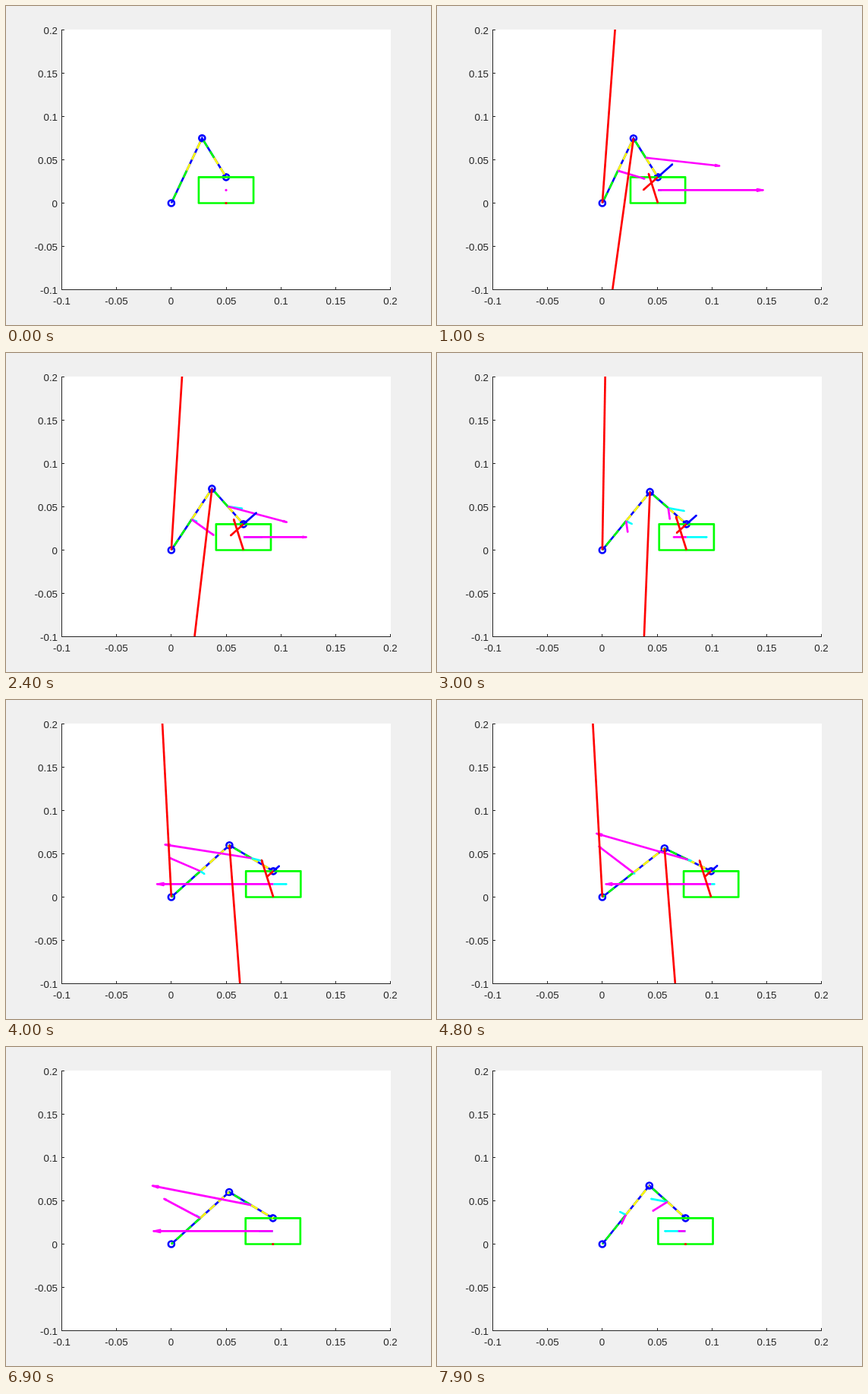
An HTML page with a canvas that plays this animation: 560x420 px, repeating every 8000 ms.

```html
<!DOCTYPE html>
<html lang="en">
<head>
<meta charset="utf-8">
<title>Two-link arm pushing a box</title>
<style>
  html, body { margin: 0; width: 100%; height: 100%; overflow: hidden; background: #f0f0f0; }
  canvas { display: block; width: 560px; height: 420px; }
</style>
</head>
<body>
<canvas id="stage" width="560" height="420"></canvas>
<script>
const ctx = document.getElementById('stage').getContext('2d');
const LOOP = 8000, STEP = 100, HOLD = 400;
const L1 = 0.08, L2 = 0.05, TOP = 0.03, HALF = 0.025;
const M1 = 0.5, M2 = 0.3, BOX = 0.05, G = 9.8;
const FRICTION = 0.25, LIFT = 1.12;   // LIFT: vertical / horizontal push at the tip
const DT = 0.01, SCALE = 0.1, TRAVEL = 0.05, OUT = 50, BACK = 49;

const X = v => 217.85 + v * 1443.4;
const Y = v => 259.5 - v * 1140;
const add = (a, b, k = 1) => [a[0] + b[0] * k, a[1] + b[1] * k];
const mul = (a, k) => [a[0] * k, a[1] * k];
const mid = (a, b) => mul(add(a, b), 0.5);

// Quintic rest-to-rest travel, out and back again
function travel(n) {
  const out = n <= OUT, count = out ? OUT : BACK;
  const u = Math.max(0, out ? n : n - OUT - 1) / count;
  const span = count * DT, dir = out ? 1 : -1;
  return {
    x: (out ? 0.05 : 0.1) + dir * TRAVEL * u ** 3 * (10 - 15 * u + 6 * u * u),
    v: dir * TRAVEL * 30 * (u * (1 - u)) ** 2 / span,
    a: dir * TRAVEL * 60 * u * (1 - u) * (1 - 2 * u) / span ** 2
  };
}

function pose(n) {
  const { x } = travel(n), d2 = x * x + TOP * TOP;
  const a = (L1 * L1 - L2 * L2 + d2) / (2 * d2);
  const h = Math.sqrt(L1 * L1 / d2 - a * a);
  const tip = [x, TOP], joint = [a * x - h * TOP, a * TOP + h * x];
  return { tip, joint, c1: mid([0, 0], joint), c2: mid(joint, tip) };
}

function line(points, color, dash = []) {
  ctx.strokeStyle = color;
  ctx.lineWidth = 2.67;
  ctx.setLineDash(dash);
  ctx.beginPath();
  points.forEach(p => ctx.lineTo(X(p[0]), Y(p[1])));
  ctx.stroke();
  ctx.setLineDash([]);
}

function dot(p, color) {
  ctx.fillStyle = color;
  ctx.beginPath();
  ctx.arc(X(p[0]), Y(p[1]), 1.6, 0, 7);
  ctx.fill();
}

function arrow(from, vector, color) {
  const to = add(from, mul(vector, SCALE));
  const dx = X(to[0]) - X(from[0]), dy = Y(to[1]) - Y(from[1]);
  const length = Math.hypot(dx, dy);
  if (length < 0.5) return;
  line([from, to], color);
  const head = length * 0.06, half = length * 0.012;
  ctx.save();
  ctx.translate(X(to[0]), Y(to[1]));
  ctx.rotate(Math.atan2(dy, dx));
  ctx.fillStyle = color;
  ctx.lineWidth = 1.8;
  ctx.lineJoin = 'round';
  ctx.beginPath();
  ctx.moveTo(0, 0);
  ctx.lineTo(-head, -half);
  ctx.lineTo(-head, half);
  ctx.closePath();
  ctx.fill();
  ctx.stroke();
  ctx.restore();
}

function axes() {
  ctx.fillStyle = '#f0f0f0';
  ctx.fillRect(0, 0, 560, 420);
  ctx.fillStyle = '#fff';
  ctx.fillRect(73, 31, 434, 343);
}

function rulers() {
  ctx.fillStyle = '#262626';
  ctx.fillRect(73, 31, 1, 343);
  ctx.fillRect(73, 373, 434, 1);
  ctx.font = '13.33px "Liberation Sans", Arial, sans-serif';
  for (let i = -2; i <= 4; i++) {
    const v = i * 0.05, label = String(+v.toFixed(2));
    const px = Math.round(X(v) - 0.5), py = Math.round(Y(v) - 0.5);
    ctx.fillRect(px, 370, 1, 4);
    ctx.fillRect(73, py, 4, 1);
    ctx.textAlign = 'center';
    ctx.fillText(label, px + 0.5, 393);
    ctx.textAlign = 'right';
    ctx.fillText(label, 68, py + 6);
  }
}

function draw(n) {
  const now = pose(n), last = pose(n - 1), older = pose(n - 2);
  const { v, a } = travel(n), { tip, joint, c1, c2 } = now;
  const base = [0, 0], foot = [tip[0], 0], center = [tip[0], TOP / 2];
  const speed = key => mul(add(now[key], last[key], -1), 1 / DT);
  const accel = key => mul(add(add(now[key], older[key]), last[key], -2), 1 / DT ** 2);
  const a1 = accel('c1'), a2 = accel('c2');

  axes();
  ctx.save();
  ctx.beginPath();
  ctx.rect(73, 31, 434, 343);
  ctx.clip();

  line([base, joint, tip], '#00f');
  for (const p of [base, joint, tip]) {
    ctx.beginPath();
    ctx.arc(X(p[0]), Y(p[1]), 4, 0, 7);
    ctx.stroke();
  }
  const left = tip[0] - HALF, right = tip[0] + HALF;
  ctx.lineJoin = 'round';
  line([[left, 0], [right, 0], [right, TOP], [left, TOP], [left, 0], [right, 0]], '#0f0');

  // Dashes run outwards from each link's centre of mass
  const dash = [10, 6];
  line([c1, base], '#0f0', dash);
  line([c1, joint], '#ff0', dash);
  line([c2, joint], '#0f0', dash);
  line([c2, tip], '#ff0', dash);

  arrow(c1, speed('c1'), '#0ff');
  arrow(c2, speed('c2'), '#0ff');
  arrow(center, [v, 0], '#0ff');
  arrow(c1, a1, '#f0f');
  arrow(c2, a2, '#f0f');
  arrow(center, [a, 0], '#f0f');
  if (!a) dot(center, '#f0f');

  if (n > 0 && n < OUT) {
    const fx = (FRICTION * BOX * G + BOX * a) / (1 + FRICTION * LIFT);
    const push = [fx, fx * LIFT], normal = BOX * G - push[1];
    const carry = add(push, add(a2, [0, G]), M2);
    const support = add(carry, add(a1, [0, G]), M1);
    arrow(tip, push, '#00f');
    arrow(base, support, '#f00');
    arrow(joint, mul(carry, -1), '#f00');
    arrow(tip, mul(push, -1), '#f00');
    arrow(foot, [-FRICTION * normal, normal], '#f00');
  } else {
    dot(foot, '#f00');
  }
  ctx.restore();
  rulers();
}

const start = performance.now();
function frame() {
  const t = Math.max(0, performance.now() - start) % LOOP;
  draw(Math.max(0, Math.floor((t - HOLD) / STEP)));
  requestAnimationFrame(frame);
}
frame();
</script>
</body>
</html>
```
